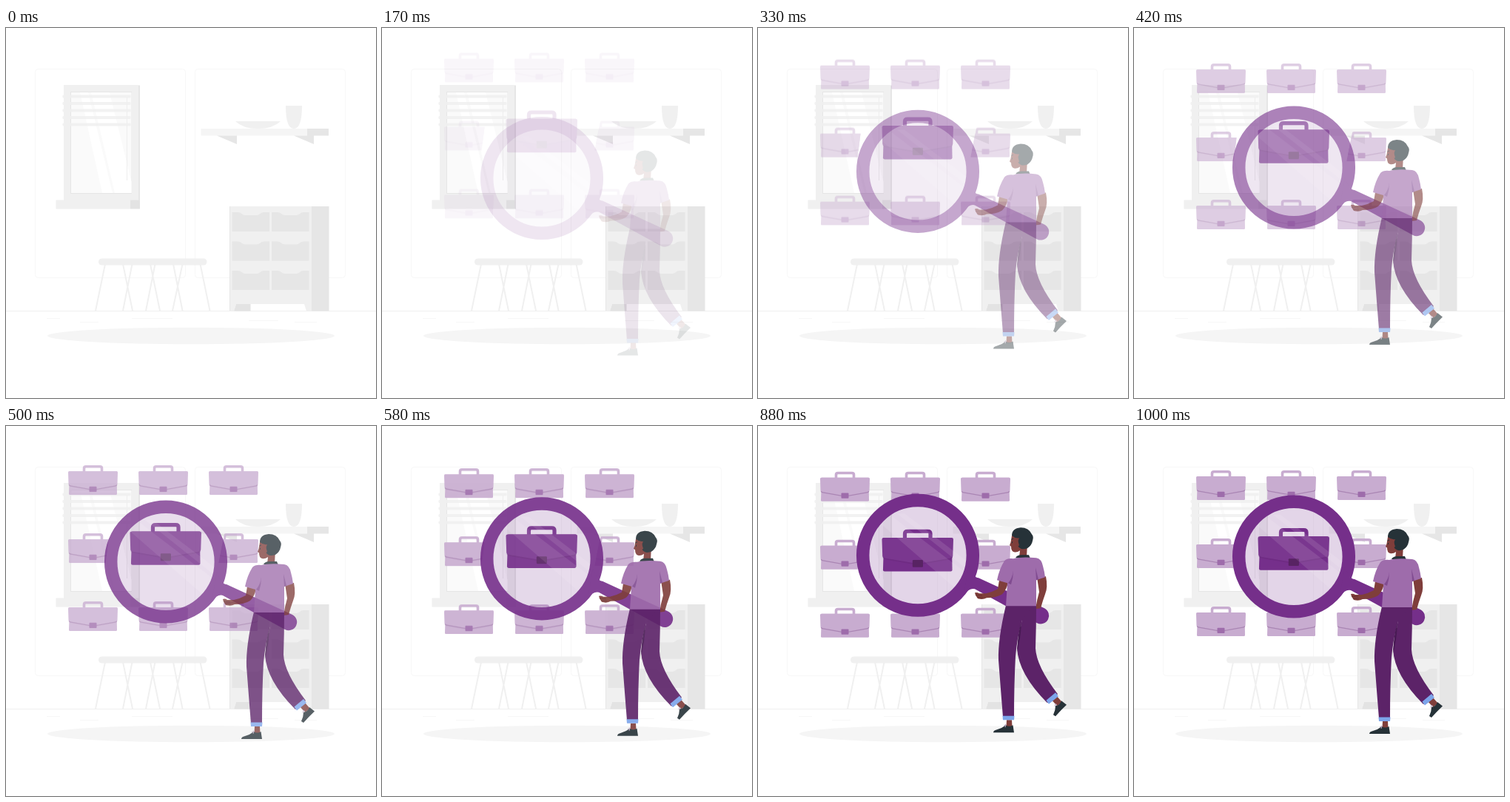
Recreate the animation shown at these times as an HTML page. Size 500 by 500 pixels, loop 1040 ms.

```html
<!DOCTYPE html>
<html lang="en">
<head>
<meta charset="utf-8">
<title>Job search</title>
<style>
  html, body { margin: 0; width: 100%; height: 100%; overflow: hidden; background: #fff; }
  svg { display: block; width: 100%; height: 100%; }
</style>
</head>
<body>
<svg viewBox="0 0 500 500">
  <defs>
    <g id="caseShape">
      <path d="M21.5 8.5V4q0-2.2 2.5-2.2h19q2.5 0 2.5 2.2v4.500" fill="none" stroke="currentColor" stroke-width="3.600"/>
      <path d="M2 8H65.500L66 38.500q0 1.500-1.500 1.500h-62q-1.500 0-1.500-1.500z" fill="currentColor"/>
      <path d="M1.500 8h64q1.500 0 1.500 1.500l-.5 16q0 1.500-2 2l-31 5-31-5q-2-.5-2-2l-.5-16q0-1.500 1.500-1.500z" fill="currentColor"/>
    </g>
    <g id="caseTrim">
      <path d="M1 26.500q1 1.300 3 1.600l29.500 5.200 29.500-5.200q2-.3 3-1.600" fill="none" stroke="#5c2368" stroke-opacity=".28" stroke-width="1.300"/>
    </g>
    <clipPath id="glass"><circle cx="216" cy="176.500" r="65.500"/></clipPath>
    <clipPath id="cutLeft"><path d="M80 148H140L133.500 201H80z"/></clipPath>
    <clipPath id="cutRight"><path d="M296 148H346V201H285.500z"/></clipPath>
  </defs>

  <g id="room">
    <g fill="none" stroke="#f7f7f7">
      <rect x="39.500" y="55.500" width="203" height="282" rx="4"/>
      <rect x="255.500" y="55.500" width="203" height="282" rx="4"/>
      <path d="M0 382.500H500" stroke="#efefef"/>
      <path d="M170 392.500h55M100 397.500h25M328 395.500h40M390 397.500h30M55 392.500h18"/>
    </g>
    <ellipse cx="250" cy="416" rx="194" ry="11.300" fill="#f5f5f5"/>

    <path d="M78 77.500H181V233H78z" fill="#e6e6e6"/>
    <path d="M78 77.500H179V233H78z" fill="#f0f0f0"/>
    <path d="M87 86H170V224H87z" fill="#e6e6e6"/>
    <path d="M88 87H169.500V223H88z" fill="#fafafa"/>
    <path d="M100 87H111L144 223H130zM115 87H140L169.500 208V223H147z" fill="#fff"/>
    <g id="blinds" fill="#f0f0f0" fill-opacity=".85"></g>
    <path d="M163.500 94V206" stroke="#eee"/>
    <path d="M67.500 232.500H168V244.500H67.500z" fill="#f0f0f0"/>
    <path d="M168 232.500H181V244.500H168z" fill="#e3e3e3"/>

    <path d="M263.500 136H407V145.500H263.500z" fill="#f5f5f5"/>
    <path d="M407 136H436V145.500H407zM285 145.500H312V157zM389 145.500H416V157z" fill="#e6e6e6"/>
    <path d="M310 126H371Q361 136 340.500 136T310 126zM378 105H400Q400 136 389 136T378 105z" fill="#f0f0f0"/>

    <path d="M413 241H436.500V382.500H413z" fill="#e6e6e6"/>
    <path d="M302 241H413V382.500H406L403 373H311L308 382.500H302z" fill="#f0f0f0"/>
    <path d="M302.500 241V382" stroke="#e6e6e6"/>
    <path d="M311 373H330.500V382.500H308z" fill="#e3e3e3"/>
    <g id="drawers" fill="#e6e6e6"></g>

    <g stroke="#f0f0f0" stroke-width="2">
      <path d="M134 319L121 382M158 319L171 382M170.500 319L158 382M201.500 319L189 382M195 319L208 382M238.500 319L225 382M226 319L238.500 382M262.500 319L275.500 382"/>
    </g>
    <rect x="125" y="311.500" width="146.500" height="9" rx="4.500" fill="#f0f0f0"/>
  </g>

  <g id="cases"></g>

  <g id="mainCase">
    <g transform="translate(167.500 138) scale(1.440 1.420)" color="#752f8a">
      <use href="#caseShape"/>
      <path d="M1.500 8h64q1.500 0 1.500 1.500l-.5 16q0 1.500-2 2l-31 5-31-5q-2-.5-2-2l-.5-16q0-1.500 1.500-1.500z" fill="#fff" fill-opacity=".05"/>
      <use href="#caseTrim"/>
      <rect x="28.700" y="29" width="9.800" height="7" rx=".8" fill="#512059"/>
    </g>
  </g>

  <g id="lens">
    <circle cx="216" cy="176.500" r="66" fill="#752f8a" fill-opacity=".2"/>
    <path d="M150 120L176 120L286 204V238zM188 120H198L296 195V206z" fill="#fff" fill-opacity=".1" clip-path="url(#glass)"/>
    <circle cx="216" cy="176.500" r="74.300" fill="none" stroke="#752f8a" stroke-width="17.500"/>
    <path d="M285 190Q291 207 298 207L387 248A11 11 0 0 1 377 268L293 222Q286 220 278 230z" fill="#752f8a"/>
  </g>

  <g id="person">
    <g fill="#7f3e3b">
      <path d="M377 206L389 205Q392 220 388 229Q385 237 382 248L375 249Q377 236 380 226z"/>
      <path d="M343 150L341.500 159L340 163L342 164.500Q342 171 346 172Q350 173 354 170L353 179H363L364 160L357 149z"/>
      <path d="M336 399H343L343.500 408H335.500zM397 372L404 367L411 375L404 380z"/>
    </g>
    <path d="M338 244L376 244Q376 272 375 302Q376 326 405 364L391 376Q352 337 350 302L357 262z" fill="#5c2368"/>
    <path d="M335 244H372L357 264Q350 288 348 313Q346 350 346 395H331Q328 358 325 318Q324 290 335 244z" fill="#5c2368"/>
    <path d="M356 266Q350 285 350.500 307Q355 290 356 266z" fill="#481a54"/>
    <path d="M330.500 393.500H346.500L346 399H331zM389.500 372.500L402 362L406 367L393 377.500z" fill="#7ca4ea"/>
    <g fill="#263238">
      <path d="M335 406Q339 409 344.500 406L346 416H318Q318 413 323 412Q330 410 335 406z"/>
      <path d="M402 380Q408 379 410 373L417 378.500Q409 386 402 394L399 392Q402 386 402 380z"/>
    </g>
    <path d="M332 407L335 405L334 409M401 381L402 377L404 379" fill="none" stroke="#bcaac4"/>
    <path d="M348 180Q350 176 356 176H366L368 181z" fill="#263238"/>
    <path d="M326 210L338 213Q336 223 330 229Q322 234 309 234Q304 237 297 235L294 230.500L293 227Q296 226 299 228L308 228Q317 226 324 222z" fill="#7f3e3b"/>
    <path d="M345 181Q356 178 376 180Q383 181 385 191Q387 198 388 206L376 210V245H335L337 214L323 210Q326 195 333 184Q337 180 345 181z" fill="#9e6cab"/>
    <path d="M345 197Q344 207 338 214L342 216Q345 207 345 197zM375 193L376 210L379 209z" fill="#814c91"/>
    <path d="M294 230L303 231M296 233L304 234" stroke="#632d2b" stroke-width=".8"/>
    <path d="M343 150Q343 140 355 139Q366 139 370 148Q373 151 371 157Q370 163 364 167Q356 170 352 165Q350 159 353 153Q348 154 343 150z" fill="#263238"/>
    <path d="M351 156Q347 157 349 162Q351 165 353 163z" fill="#7f3e3b"/>
    <path d="M342.500 155L345 154M343.500 158V160" stroke="#263238"/>
  </g>
</svg>

<script>
const $ = id => document.getElementById(id);
const range = n => [...Array(n).keys()];

$('blinds').innerHTML = range(5).map(i =>
  `<rect x="76.5" y="${90.5 + i * 9.5}" width="92" height="4" rx="1"/>`).join('');

$('drawers').innerHTML = range(6).map(i =>
  `<path transform="translate(${305.5 + i % 2 * 53.5} ${249 + (i >> 1) * 39.5})"
    d="M0 0H8Q11 0 13 2Q15 4 18 4H33Q36 4 38 2Q40 0 43 0H50.500V26H0z"/>`).join('');

// 3 × 3 grid of small cases; the middle cell belongs to the large one.
const clips = { 3: 'cutLeft', 5: 'cutRight' };
$('cases').innerHTML = range(9).filter(i => i !== 4).map(i => {
  const clip = clips[i] ? ` clip-path="url(#${clips[i]})"` : '';
  return `<g${clip}><g transform="translate(${84 + i % 3 * 95} ${60 + Math.floor(i / 3) * 92})" color="#c8acd0">
    <use href="#caseShape"/><use href="#caseTrim"/>
    <rect x="28.5" y="28.7" width="10" height="7.3" rx="1" fill="#9e6cab"/></g></g>`;
}).join('');

// One coordinate of a cubic Bézier running from 0 to 1.
const curve = (a, b, s) => 3 * (1 - s) ** 2 * s * a + 3 * (1 - s) * s * s * b + s ** 3;

function ease(x) {
  let lo = 0, hi = 1;
  for (let i = 0; i < 24; i++) {
    const mid = (lo + hi) / 2;
    if (curve(.36, .5, mid) < x) lo = mid; else hi = mid;
  }
  return curve(-.01, 1.38, lo);
}

const LOOP = 1040;
const slides = { cases: -30, mainCase: -30, lens: 30, person: 30 };

function draw(now) {
  const step = Math.floor(now % LOOP * .024 + .09); // 24 steps a second
  const y = step < 2 ? 0 : ease(Math.min(1, step / 24 + .013));
  for (const [id, from] of Object.entries(slides)) {
    $(id).setAttribute('transform', `translate(0 ${from * (1 - y)})`);
    $(id).setAttribute('opacity', Math.max(0, Math.min(1, y)));
  }
}

const start = performance.now();
function tick() {
  draw(performance.now() - start);
  requestAnimationFrame(tick);
}
tick();
</script>
</body>
</html>
```
